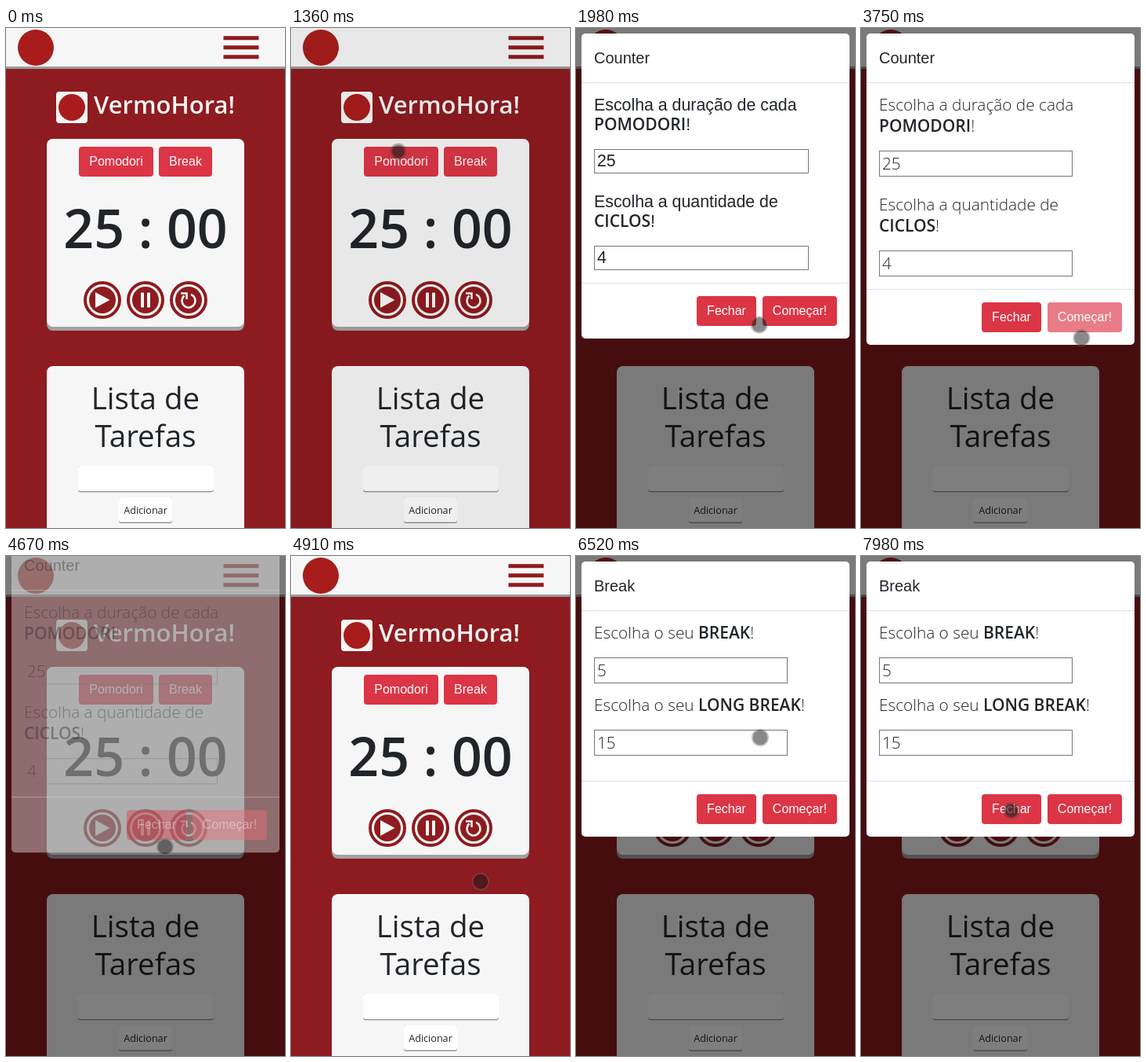
Recreate the animation shown at these times as an HTML page with a canvas. Size 356 by 636 pixels, loop 8000 ms.

```html
<!DOCTYPE html>
<html lang="pt">
<head>
<meta charset="utf-8">
<title>Timer</title>
<style>
  html, body { margin: 0; width: 100%; height: 100%; overflow: hidden; background: #8e1b1f; }
  canvas { display: block; width: 356px; height: 636px; }
</style>
</head>
<body>
<canvas id="stage" width="356" height="636"></canvas>
<script>
const ctx = document.getElementById('stage').getContext('2d');
const LOOP = 8000, W = 356, H = 636, MID = W / 2;
const RED = '#8e1b1f', PAPER = '#f6f6f6', INK = '#212529', DANGER = '#dc3545', FRUIT = '#a81d1b';
const ARIAL = '"Liberation Sans", Arial, sans-serif';
const SANS = '"Open Sans", "Noto Sans", sans-serif';
const PLAIN = '21.33px ' + ARIAL, LIGHT = '300 20.8px ' + SANS, STRONG = '600 21px ' + SANS;

// pointer strokes: each bends towards `via` and starts where the last one ended
const ENTRY = [355, 271];
const STROKES = [
  { at: 360, via: [30, 40], to: [137, 157] },
  { at: 1360, via: [293, 281], to: [222, 401] },
  { at: 2590, via: [180, 385], to: [287, 371] },
  { at: 3680, via: [230, 620], to: [198, 360], span: 530 },
  { at: 4590, via: [280, 528], to: [236, 185] },
  { at: 6140, via: [233, 163], to: [238, 420] },
  { at: 7180, via: [225, 370], to: [192, 324] }
];
const CLICKS = [1210, 3400, 4420, 5900, 7900];

const clamp = p => Math.max(0, Math.min(1, p));
const ramp = (t, start, span) => clamp((t - start) / span);
const easeOut = p => 1 - (1 - p) ** 2;
const smooth = p => p * p * (3 - 2 * p);

function box(x, y, w, h, r, color) {
  ctx.fillStyle = color;
  ctx.beginPath();
  ctx.roundRect(x, y, w, h, r);
  ctx.fill();
}

function disc(x, y, r, color) {
  ctx.fillStyle = color;
  ctx.beginPath();
  ctx.arc(x, y, r, 0, 7);
  ctx.fill();
}

function ring(x, y, r, width, color, from = 0, to = 7) {
  ctx.strokeStyle = color;
  ctx.lineWidth = width;
  ctx.beginPath();
  ctx.arc(x, y, r, from, to);
  ctx.stroke();
}

// draws text and returns its right edge
function text(str, x, y, font, color = INK, align = 'left') {
  ctx.font = font;
  ctx.fillStyle = color;
  ctx.textAlign = align;
  ctx.fillText(str, x, y);
  return x + ctx.measureText(str).width;
}

function button(label, x, y, w) {
  box(x, y, w, 38, 4, DANGER);
  text(label, x + w / 2, y + 24, '16px ' + ARIAL, '#fff', 'center');
}

function drawHeader() {
  box(0, 0, W, 52, 0, '#9a9a9a');
  box(0, 0, W, 49, 0, PAPER);
  disc(38, 25, 23, FRUIT);
  for (let i = 0; i < 3; i++) box(277.5, 10.3 + i * 12, 45, 5, 0, RED);
  box(64, 81, 40, 40, 4, PAPER);
  disc(84, 101, 17, FRUIT);
  text('VermoHora!', 202, 109, '600 31px ' + SANS, PAPER, 'center');
}

function playIcon(x, y) {
  ctx.beginPath();
  ctx.moveTo(x - 9, y - 10);
  ctx.lineTo(x + 9.5, y);
  ctx.lineTo(x - 9, y + 10);
  ctx.fill();
}

function pauseIcon(x, y) {
  box(x - 6, y - 9.5, 4, 19, 1, PAPER);
  box(x + 2, y - 9.5, 4, 19, 1, PAPER);
}

function resetIcon(x, y) {
  ring(x, y + 1, 8.5, 2.6, PAPER, -1.2, 4);
  ctx.beginPath();
  ctx.moveTo(x - 10, y - 8.5);
  ctx.lineTo(x - 2.5, y - 8.5);
  ctx.lineTo(x - 2.5, y - 1);
  ctx.stroke();
}

function drawTimer(t) {
  box(52, 141, 252, 244, 8, '#a2a2a2');
  box(52, 141, 252, 239, 8, PAPER);
  button('Pomodori', 93, 151, 95);
  button('Break', 195, 151, 68);
  text(t < 5450 ? '25 : 00' : '24 : 59', MID, 280, '600 68px ' + SANS, INK, 'center');

  [playIcon, pauseIcon, resetIcon].forEach((icon, i) => {
    const x = MID + (i - 1) * 55, y = 346;
    disc(x, y, 24, RED);
    ring(x, y, 18.5, 3, PAPER);
    ctx.fillStyle = PAPER;
    icon(x, y);
  });
}

function drawTasks() {
  const heading = '500 38.5px ' + SANS;
  box(52, 430, 252, 230, 8, PAPER);
  text('Lista de', MID, 485, heading, INK, 'center');
  text('Tarefas', MID, 533, heading, INK, 'center');
  box(92, 557, 173, 33.5, 3, '#999');
  box(92, 557, 173, 32, 3, '#fefefe');
  box(144, 597, 68, 33, 3, '#999');
  box(144, 597, 68, 31.5, 3, '#fefefe');
  text('Adicionar', MID, 618, '500 12.6px ' + SANS, INK, 'center');
}

function field(value, y, w, h, font) {
  ctx.lineWidth = 1;
  ctx.strokeStyle = '#767676';
  ctx.strokeRect(23.5, y + .5, w - 1, h - 1);
  text(value, 27, y + h - 9.5, font);
}

function strongLine(lead, strong, y, font) {
  let x = text(lead, 23, y, font);
  x = text(strong, x, y, STRONG);
  text('!', x, y, font);
}

function dialog(title, bottom, fade) {
  box(7, 7, 342, bottom - 7, 5, '#fff');
  text(title, 23, 45, '20px ' + ARIAL);
  box(7, 69, 342, 1, 0, '#dee2e6');
  box(7, bottom - 71, 342, 1, 0, '#dee2e6');
  button('Fechar', 154, bottom - 54, 76);
  button('Começar!', 238, bottom - 54, 95);
  if (fade) box(238, bottom - 54, 95, 38, 4, `rgba(255,255,255,${.35 * fade})`);
}

// the light face arrives late, which shifts the layout
function drawCounter(t) {
  const loaded = t >= 2050;
  const font = loaded ? LIGHT : PLAIN;
  const w = loaded ? 247 : 274, h = loaded ? 33 : 31, line = loaded ? 27 : 25;
  dialog('Counter', loaded ? 403 : 395, ramp(t, 3400, 120));
  const rows = [['Escolha a duração de cada', 'POMODORI', '25'],
                ['Escolha a quantidade de', 'CICLOS', '4']];
  rows.forEach(([lead, strong, value], i) => {
    const y = 105 + i * (loaded ? 127 : 123);
    text(lead, 23, y, font);
    strongLine('', strong, y + line, font);
    field(value, y + line + 24, w, h, font);
  });
}

function drawBreak() {
  dialog('Break', 357, 0);
  [['BREAK', '5'], ['LONG BREAK', '15']].forEach(([strong, value], i) => {
    const y = 105 + i * 92;
    strongLine('Escolha o seu ', strong, y, LIGHT);
    field(value, y + 24, 247, 33, LIGHT);
  });
}

// opening: shade, then dialog; closing: dialog, then shade
function modal(t, open, close, draw) {
  const shade = ramp(t, open, 150) * (1 - ramp(t, close + 150, 150));
  const alpha = ramp(t, open + 150, 150) * (1 - ramp(t, close, 150));
  const drop = easeOut(ramp(t, open + 150, 300)) - easeOut(ramp(t, close, 300));
  if (shade > 0) box(0, 0, W, H, 0, `rgba(0,0,0,${shade / 2})`);
  if (alpha > 0) {
    ctx.save();
    ctx.globalAlpha = alpha;
    ctx.translate(0, -50 * (1 - drop));
    draw(t);
    ctx.restore();
  }
}

function pointerAt(t) {
  let pos = ENTRY;
  for (const { at, via, to, span = 770 } of STROKES) {
    if (t < at) break;
    const p = smooth(ramp(t, at, span)), q = 1 - p;
    pos = pos.map((from, k) => q * q * from + 2 * p * q * via[k] + p * p * to[k]);
  }
  return pos;
}

function drawPointer(t) {
  if (t < STROKES[0].at) return;
  const [x, y] = pointerAt(t);
  if (CLICKS.some(c => t >= c && t < c + 190)) {
    disc(x, y, 10.5, 'rgba(60,60,60,.38)');
    disc(x, y, 8, 'rgba(0,0,0,.36)');
  } else {
    disc(x, y, 9.5, 'rgba(20,20,20,.5)');
    ring(x, y, 10.3, 1.6, 'rgba(110,110,110,.4)');
  }
}

function render(t) {
  box(0, 0, W, H, 0, RED);
  drawHeader();
  drawTimer(t);
  drawTasks();
  modal(t, 1343, 4580, drawCounter);
  modal(t, 6060, LOOP, drawBreak);
  drawPointer(t);
}

const begin = performance.now();
function tick() {
  render((performance.now() - begin) % LOOP);
  requestAnimationFrame(tick);
}
tick();
</script>
</body>
</html>
```
